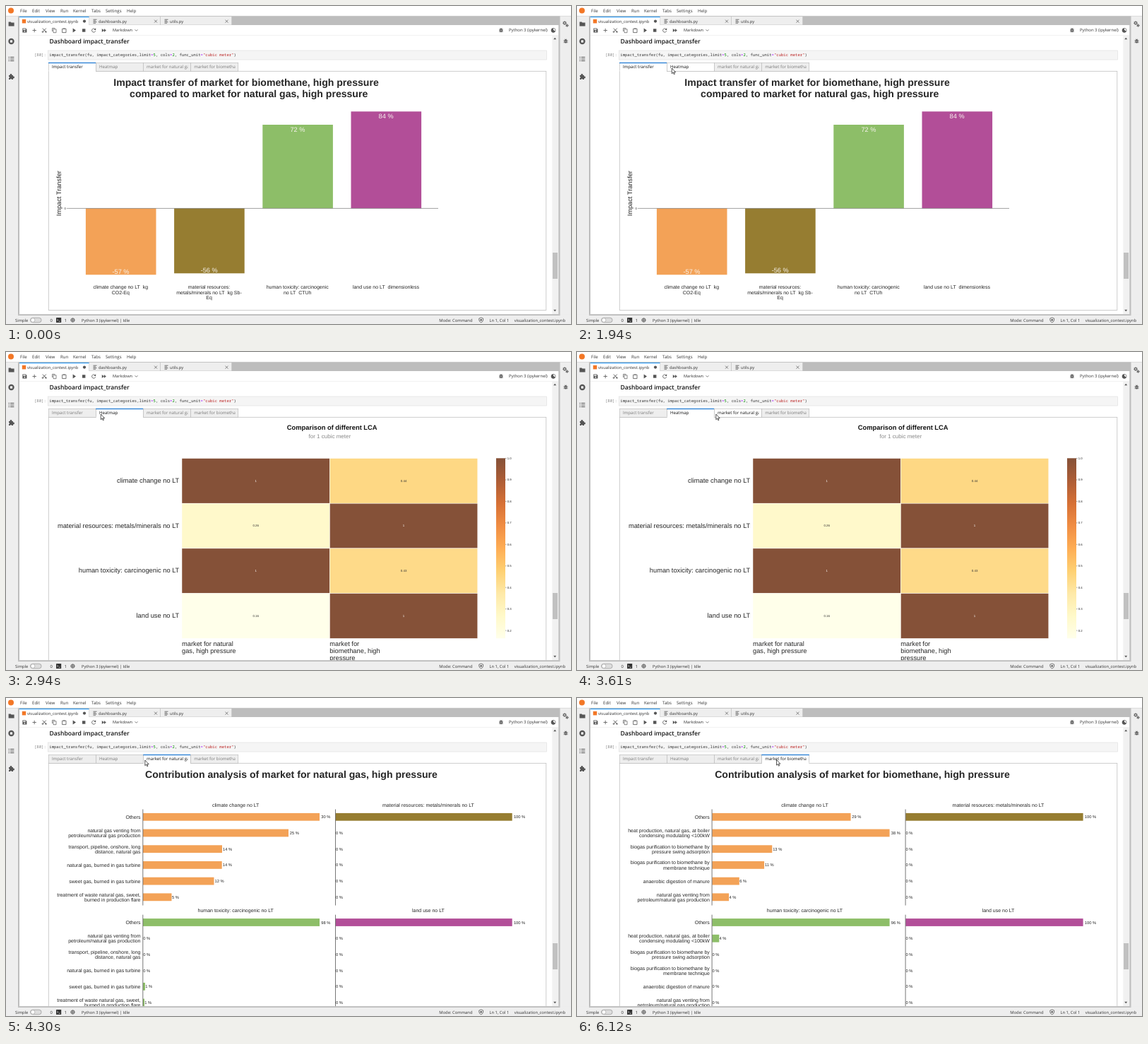
Recreate the animation shown at these times as an HTML page. Size 800x450 px, loop 6700 ms.

```html
<!DOCTYPE html>
<html lang="en">
<head>
<meta charset="utf-8">
<title>Impact transfer dashboard</title>
<style>
html, body { margin: 0; width: 100%; height: 100%; overflow: hidden; background: #fff; }
svg { display: block; font-family: "Open Sans", "Noto Sans", sans-serif; fill: #333; text-rendering: geometricPrecision; }
.plot { font-family: "Liberation Sans", Arial, sans-serif; fill: #262626; }
.code { font-family: "Noto Sans Mono", "DejaVu Sans Mono", monospace; white-space: pre; }
.b { font-weight: 700; }
.m { text-anchor: middle; }
.e { text-anchor: end; }
</style>
</head>
<body>
<svg id="stage" width="800" height="450" viewBox="0 0 800 450">
  <g id="frame"></g>
  <g id="panel" class="plot"></g>
  <g id="tabs" class="plot"></g>
  <g id="bars"></g>
  <path id="cursor" d="M0 0v7.6l1.8-1.6 1.2 2.7 1.2-.5-1.2-2.6h2.4z" fill="#fff" stroke="#111" stroke-width=".7"/>
</svg>
<script>
const $ = id => document.getElementById(id);
const LOOP = 6700;
const ORANGE = '#f3a257', BROWN = '#967d31', GREEN = '#8dbe68', PINK = '#b24e98', DOCK = '#bdbdbd';

const rect = (x, y, w, h, fill, more = '') =>
  `<rect x="${x}" y="${y}" width="${w}" height="${h}" fill="${fill}" ${more}/>`;
const text = (x, y, s, size = 5.8, cls = '', more = '') =>
  `<text x="${x}" y="${y}" font-size="${size}" class="${cls}" ${more}>${s}</text>`;
const lines = (x, y, s, size, step, cls) =>
  s.split('|').map((l, i) => text(x, y + i * step, l, size, cls)).join('');
const path = (d, width = .8, color = '#555', fill = 'none') =>
  `<path d="${d}" stroke="${color}" stroke-width="${width}" fill="${fill}"/>`;
const solid = (d, fill = '#555') => `<path d="${d}" fill="${fill}"/>`;
const dot = (x, y, r, fill, more = '') => `<circle cx="${x}" cy="${y}" r="${r}" fill="${fill}" ${more}/>`;
const ring = (x, y, r, width, dash = '') =>
  dot(x, y, r, 'none', `stroke="#555" stroke-width="${width}" stroke-dasharray="${dash}"`);
const bug = (x, y) => `<ellipse cx="${x}" cy="${y}" rx="1.9" ry="2.6" fill="#555"/>` +
  path(`M${x - 3} ${y - 1.5}h6m-6 1.6h6m-6 1.6h6M${x - 1.5} ${y - 3.2}l3 1.5m0-1.5l-3 1.5`, .6) +
  path(`M${x - .9} ${y - .6}h1.8m-1.8 1.3h1.8`, .5, '#fff');
const gear = (x, y, r) => ring(x, y, r, 1.1) + ring(x, y, r + .9, .9, '1 .9');

// Page frame, toolbar and notebook cell
function frame() {
  const menu = { File: 20, Edit: 37, View: 56, Run: 77, Kernel: 95, Tabs: 121, Settings: 141, Help: 171 };
  let s = rect(0, 0, 800, 450, '#eee') + rect(0, 0, 800, 14, '#fff') +
    path('M0 14.3H800', .6, '#ccc') + dot(7, 6.5, 4, '#f37726');
  for (const name in menu) s += text(menu[name], 9.2, name, 6.1);
  s += rect(17, 14.3, 767.5, 423.7, DOCK) + rect(19, 27, 763.3, 409.2, '#fff');

  // File tabs
  s += rect(19, 15, 98.5, 12.2, '#fff') + rect(19, 15, 98.5, 1.1, '#2196f3') +
    rect(118, 15, 100.3, 11.6, '#eee') + rect(219, 15, 100.3, 11.6, '#eee') +
    rect(22.8, 18.8, 5.4, 5.6, '#f37726') + dot(111, 21.6, 2.1, '#555') +
    text(30, 23.8, 'visualization_contest.ipynb');
  [[123.5, 'dashboards.py', 212], [224.5, 'utils.py', 312.5]].forEach(([x, name, close]) => {
    s += path(`M${x} 19.2h5m-5 1.7h3.6m-3.6 1.7h5m-5 1.7h3.6`, .8) + text(x + 7.5, 23.8, name) +
      path(`M${close - 2} 19.6l4 4m0-4l-4 4`, .7);
  });

  // Toolbar
  s += solid('M23.4 31.5h4.6l1.4 1.4v4.6h-6z') + rect(24.3, 32.3, 3.4, 1.5, '#fff') + dot(26.4, 35.7, .9, '#fff') +
    path('M37.5 34.5h5.4m-2.7-2.7v5.4', .8) +
    path('M51.8 31.6l5 5.2m0-5.2l-5 5.2', .9) + ring(52, 36.6, .9, .7) + ring(56.5, 36.6, .9, .7) +
    path('M65.5 36v-4.6h3.8M67 32.8h4v4.9h-4z', .7) +
    path('M79.6 32.2h5.4v5.4h-5.4zM81 32h2.6', .8) +
    solid('M94.6 31.6l4.4 2.9-4.4 2.9z') + rect(108, 32.3, 4.4, 4.4, '#555') +
    path('M126.4 33.2a2.6 2.6 0 1 0 .3 2', .8) + solid('M127.2 31.3v2.7h-2.7z') +
    solid('M135.8 32l3 2.5-3 2.5zM138.8 32l3 2.5-3 2.5z') +
    text(151, 36.4, 'Markdown', 5.65) + path('M182.6 33.4l1.9 1.9 1.9-1.9', .8) +
    bug(701, 34.6) + text(712, 36.4, 'Python 3 (ipykernel)', 5.95) +
    ring(775, 34.4, 3, .7) + solid('M775 31.4a3 3 0 0 0 0 6 3 3 0 0 0 2.8-2 3 3 0 0 1-2.8-4z') +
    path('M19 41.5H782', .5, '#e4e4e4');

  // Side bars
  s += solid('M3.6 22.4h3l1 1h4v5.2h-8z') +
    dot(7.5, 50, 4.2, '#555') + rect(5.9, 48.4, 3.2, 3.2, '#fff') +
    path('M3.6 72.4h1.4m1 0h5.4M3.6 75h1.4m1 0h5.4M3.6 77.6h1.4m1 0h5.4', 1) +
    rect(4, 98, 6, 6, '#555') + dot(7, 97.3, 1.4, '#555') + dot(10.6, 101, 1.4, '#555') +
    dot(4, 101, 1, '#eee') + dot(7, 104, 1, '#eee') +
    gear(791, 24, 1.5) + gear(794.4, 27.6, .9) + bug(792.5, 50);

  // Cell
  const code = 'impact_transfer(fu, impact_categories,limit=5, cols=2, func_unit="cubic meter")'
    .replace(/"[^"]*"|=|\b\d\b/g, k => `<tspan fill="${k == '=' ? '#a2f' : k[0] == '"' ? '#ba2121' : '#080'}">${k}</tspan>`);
  s += text(61.5, 53, 'Dashboard impact_transfer', 8.6, '', 'font-weight="600" fill="#111"') +
    rect(59.5, 63, 706, 13, '#f5f5f5', 'stroke="#e0e0e0" stroke-width=".7"') +
    text(40, 71.3, '[80]:', 5.59, 'code', 'fill="#888"') + text(61.3, 71.3, code, 5.59, 'code');
  return s;
}

function statusBar() {
  return rect(0, 436.2, 800, 14, '#eee') + rect(17, 436.2, 767.5, 1.8, DOCK) +
    text(13, 446.5, 'Simple') + rect(34.5, 441.2, 15.6, 6.6, '#ddd', 'rx="3.3" stroke="#888" stroke-width=".6"') +
    dot(38, 444.5, 2.9, '#fff', 'stroke="#888" stroke-width=".5"') +
    text(62.5, 446.5, '0') + rect(71, 441, 7.2, 7, '#333', 'rx=".6"') +
    path('M72.3 443l1.5 1.4-1.5 1.4M74.6 446.2h2', .7, '#fff') +
    text(82.8, 446.5, '1') + ring(94.5, 444.5, 2.6, 1) + path('M92 444.5h5M94.5 442v5', .8) +
    text(107, 446.5, 'Python 3 (ipykernel) | Idle', 5.68) +
    text(660.5, 446.5, 'Mode: Command', 5.85, 'e') +
    path('M672.7 441l2.9 1.1v2q0 2.6-2.9 3.8-2.9-1.2-2.9-3.8v-2z', .8) + dot(672.7, 444.3, 1.3, '#555') +
    text(684.5, 446.5, 'Ln 1, Col 1') + text(792, 446.5, 'visualization_contest.ipynb', 5.8, 'e');
}

const TABS = ['Impact transfer', 'Heatmap', 'market for natural gas', 'market for biomethan'];
const tabX = i => 60.3 + i * 67.1;

function tabs(active, hover) {
  return TABS.map((name, i) => {
    const x = tabX(i), on = i == active, lit = on || i == hover;
    return rect(x, 80.3, 67.1, 12, lit ? '#fff' : '#eee', 'stroke="#bdbdbd" stroke-width=".7"') +
      (on ? rect(x + .3, 91, 66.5, 2, '#fff') + rect(x - .3, 79.9, 67.5, 1.2, '#1976d2') : '') +
      `<svg x="${x + 4.6}" y="81" width="58.4" height="11">` +
      text(0, 7, name, 6.12, '', `fill="${lit ? '#111' : '#7a7a7a'}"`) + '</svg>';
  }).join('');
}

function impactChart() {
  const data = [
    [-57, 94, ORANGE, 'climate change no LT&#160; kg|CO2-Eq'],
    [-56, 92, BROWN, 'material resources:|metals/minerals no LT&#160; kg Sb-|Eq'],
    [72, -118.3, GREEN, 'human toxicity: carcinogenic|no LT&#160; CTUh'],
    [84, -137, PINK, 'land use no LT&#160; dimensionless']];
  let s = text(340, 113.3, 'Impact transfer of market for biomethane, high pressure', 14.08, 'b m') +
    text(343.7, 129.2, 'compared to market for natural gas, high pressure', 14.08, 'b m') +
    text(0, 0, 'Impact Transfer', 9.25, 'm', 'transform="translate(78.3 265.2) rotate(-90)"') +
    text(82.6, 287.8, '0', 4.2) + path('M86 286.4h3', .5);
  data.forEach(([value, h, color, label], i) => {
    const x = 112.9 + i * 125.2;
    s += rect(x, Math.min(286.3, 286.3 + h), 99.6, Math.abs(h), color) +
      text(x + 49.6, h > 0 ? 284.6 + h : 295.8 + h, value + ' %', 9.2, 'm', 'fill="#f8f4ee"') +
      lines(x + 49.4, 400.3, label, 7, 7.4, 'm');
  });
  return s + path('M89 286.4H612', .7, '#777');
}

const SCALE = ['ffffe5', 'fff7bc', 'fee391', 'fec44f', 'fe9929', 'ec7014', 'cc4c02', '993404', '662506'];
// Colour for a position 0..1, lightened over white
function heat(p) {
  const k = Math.min(7, Math.floor(p * 8)), f = p * 8 - k;
  const ch = (c, j) => parseInt(SCALE[c].substr(j * 2, 2), 16);
  return `rgb(${[0, 1, 2].map(j => Math.round(51 + .8 * (ch(k, j) * (1 - f) + ch(k + 1, j) * f)))})`;
}

function heatmap() {
  const rows = [
    ['climate change no LT', 1, .44], ['material resources: metals/minerals no LT', .26, 1],
    ['human toxicity: carcinogenic no LT', 1, .43], ['land use no LT', .16, 1]];
  let s = text(461.7, 110.3, 'Comparison of different LCA', 9.36, 'b m', 'fill="#111"') +
    text(458.3, 122.4, 'for 1 cubic meter', 8, 'm', 'fill="#888"');
  rows.forEach(([label, ...values], i) => {
    const y = 150.5 + i * 63.7;
    s += text(245.3, y + 34.4, label, 9.3, 'e');
    values.forEach((v, j) => {
      const x = 249 + j * 209.4;
      s += rect(x, y, 209.4, 63.7, heat((v - .16) / .84), 'stroke="#fff" stroke-width=".5"') +
        text(x + 104.7, y + 33.2, v, 4.4, 'm', `fill="${v == 1 ? '#fff' : '#333'}"`);
    });
  });
  s += lines(249, 415.8, 'market for natural|gas, high pressure', 9.3, 10.3) +
    lines(458.3, 415.8, 'market for|biomethane, high|pressure', 9.3, 10.3);
  s += '<linearGradient id="scale" x1="0" x2="0" y1="1" y2="0">' +
    SCALE.map((c, i) => `<stop offset="${i / 8}" stop-color="${heat(i / 8)}"/>`).join('') +
    '</linearGradient>' + rect(694, 150.3, 13, 255, 'url(#scale)');
  for (let k = 2; k <= 10; k++) {
    const y = 150.5 + (10 - k) * 30.45;
    s += path(`M707 ${y}h1.6`, .5) + text(709.7, y + 1.5, (k / 10).toFixed(1), 4.3);
  }
  return s;
}

// Two by two bar charts; bars are [percent, width] and missing ones are zero
function contribution(title, x0, x1, full, labels, orange, green) {
  const charts = [
    [x0, 0, 'climate change no LT', ORANGE, orange],
    [x1, 0, 'material resources: metals/minerals no LT', BROWN, [[100, full]]],
    [x0, 149.2, 'human toxicity: carcinogenic no LT', GREEN, green],
    [x1, 149.2, 'land use no LT', PINK, [[100, full]]]];
  let s = text(404, 113.4, `Contribution analysis of market for ${title}, high pressure`, 14.08, 'b m');
  for (const [x, dy, name, color, bars] of charts) {
    s += text(x + 131.2, 154.2 + dy, name, 7, 'm');
    labels.forEach((label, i) => {
      const y = 168.3 + dy + i * 22.7, [pct, w] = bars[i] || [0, 0];
      if (x == x0) s += lines(x - 3.5, y + (label.includes('|') ? -1 : 2.4), label, 7, 7.2, 'e');
      s += rect(x, y - 5.4, w, 10.8, color) + text(x + w + .2 + w * .008, y + 2, pct + ' %', 5.75);
    });
    s += path(`M${x - .2} ${157.5 + dy}v136`, .8, '#555');
  }
  return s;
}

const PANELS = [
  impactChart(),
  heatmap(),
  contribution('natural gas', 194, 466.7, 250, [
    'Others', 'natural gas venting from|petroleum/natural gas production',
    'transport, pipeline, onshore, long|distance, natural gas', 'natural gas, burned in gas turbine',
    'sweet gas, burned in gas turbine', 'treatment of waste natural gas, sweet,|burned in production flare'],
    [[30, 250], [25, 206], [14, 112], [14, 111.7], [12, 100.5], [5, 40.5]],
    [[98, 250], , , , [1, 3], [1, 2]]),
  contribution('biomethane', 191.3, 465.3, 251.3, [
    'Others', 'heat production, natural gas, at boiler|condensing modulating &lt;100kW',
    'biogas purification to biomethane by|pressure swing adsorption',
    'biogas purification to biomethane by|membrane technique', 'anaerobic digestion of manure',
    'natural gas venting from|petroleum/natural gas production'],
    [[29, 196.3], [38, 251.3], [13, 85], [11, 73.8], [6, 38.5], [4, 23.8]],
    [[96, 251.3], [4, 10]])];
const THUMB = [349, 341, 347, 347];

const panel = i =>
  rect(60.3, 92.3, 704.5, i ? 360 : 338.2, '#fff', 'stroke="#c0c0c0" stroke-width=".8"') + PANELS[i] +
  rect(773.3, 42, 8.7, 394, '#f1f1f1') + rect(774, THUMB[i], 7, 37, '#c1c1c1') +
  solid('M775.2 47.2h4l-2-2.4zM775.2 429.8h4l-2 2.4z');

// Pointer moves: start, end, from, to
const MOVES = [
  [1670, 1910, [160, 452], [134.3, 88]],
  [2940, 3500, [134.3, 88], [196.8, 88]],
  [4330, 4520, [196.8, 88], [299, 86]],
  [4670, 5120, [299, 86], [282.5, 87.5]]];

function pointer(t) {
  const move = MOVES.filter(m => t >= m[0]).pop();
  if (!move) return null;
  const [start, end, a, b] = move, p = Math.min(1, (t - start) / (end - start)), e = p * p * (3 - 2 * p);
  return a.map((v, i) => v + (b[i] - v) * e);
}

$('frame').innerHTML = frame();
$('bars').innerHTML = statusBar();

let shown = -1, tabKey = '';
function draw(now) {
  const t = now % LOOP, pos = pointer(t);
  const active = [2000, 3640, 5670].filter(s => t >= s).length;
  const hover = pos && pos[1] > 80 && pos[1] < 92 ? TABS.findIndex((_, i) => pos[0] < tabX(i + 1)) : -1;
  if (active != shown) $('panel').innerHTML = panel(shown = active);
  if (tabKey != active + ',' + hover) {
    tabKey = active + ',' + hover;
    $('tabs').innerHTML = tabs(active, hover);
  }
  $('cursor').setAttribute('transform', `translate(${pos || [-20, -20]})`);
  requestAnimationFrame(draw);
}
draw(performance.now());
</script>
</body>
</html>
```
